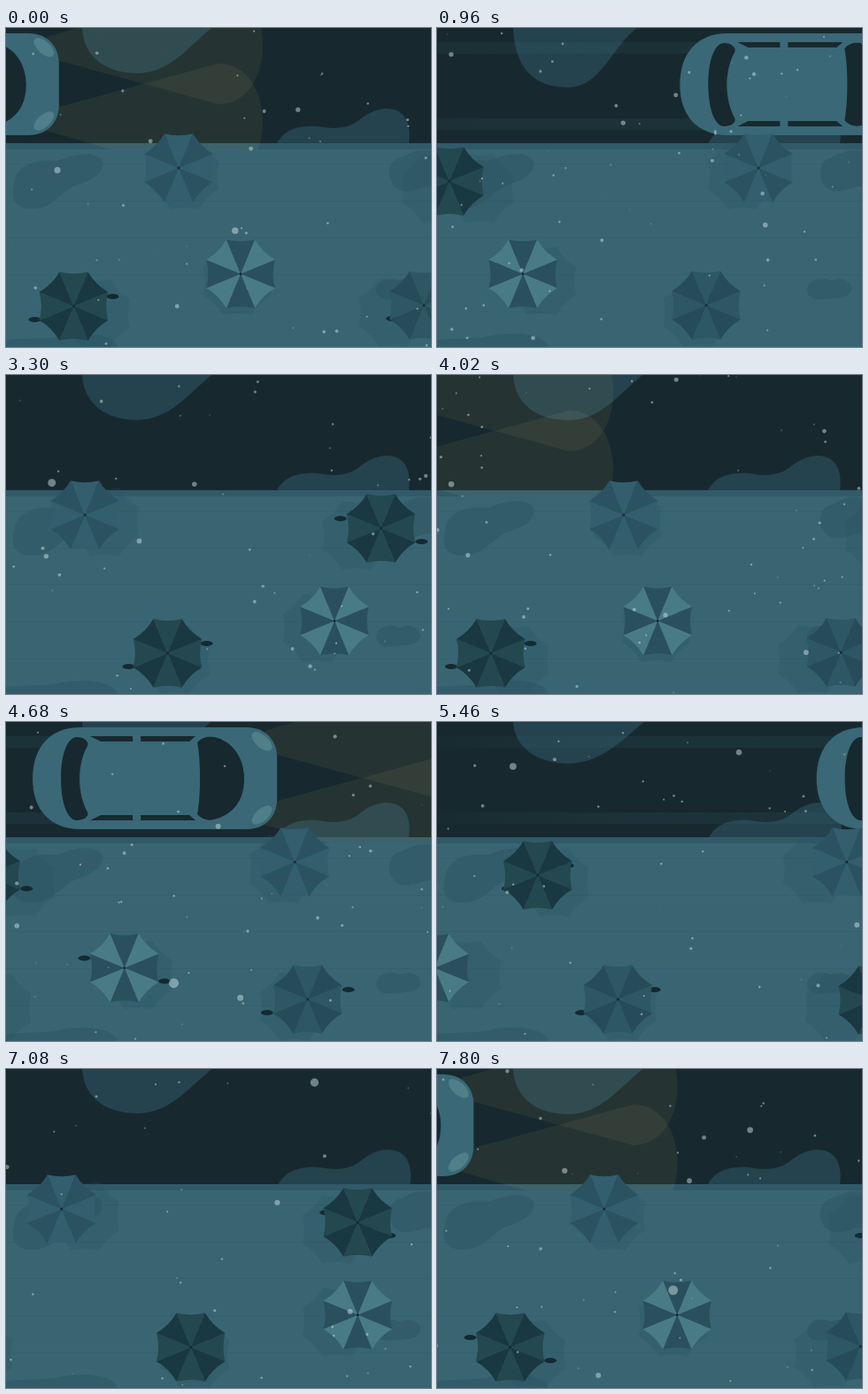
Write an HTML page that moves like this. It is 480 px wide and 360 px high and loops after 7860 ms.

```html
<!DOCTYPE html>
<html lang="en">
<head>
<meta charset="utf-8">
<title>Night street from above</title>
<style>
html, body { margin: 0; width: 100%; height: 100%; overflow: hidden; background: #17292f; }
svg { display: block; width: 100vw; height: 100vh; }
</style>
</head>
<body>
<svg viewBox="0 0 480 360" xmlns="http://www.w3.org/2000/svg">
  <defs>
    <linearGradient id="fade">
      <stop offset="0" stop-color="#3a6876" stop-opacity="0"/>
      <stop offset=".5" stop-color="#3a6876" stop-opacity=".14"/>
      <stop offset="1" stop-color="#3a6876" stop-opacity=".14"/>
    </linearGradient>
    <clipPath id="street"><rect width="480" height="137"/></clipPath>
    <path id="beam" d="M-14 10 L180 -46 C247 -46 247 86 180 86 L-14 33Z"/>
    <path id="sideGlass" d="M65 16H113V22H77ZM122 16H184L177 22H122Z"/>
  </defs>

  <rect width="480" height="360" fill="#17292f"/>
  <g fill="#24434f">
    <path id="topPuddle"/>
    <path id="sidePuddle" d="M306 130C316 112 335 110 352 111C375 115 387 113 400 103C415 91 431 88 443 94C455 101 457 116 455 130Z"/>
  </g>
  <rect y="130" width="480" height="7" fill="#315a69"/>
  <rect y="137" width="480" height="223" fill="#396573"/>
  <path d="M0 153.500H480M0 195.500H480M0 236.500H480M0 278.500H480M0 320.500H480" stroke="#325a67" stroke-width="1" opacity=".5"/>
  <g fill="#335c6a">
    <path d="M9 176C12 153 34 148 58 150C78 141 104 138 109 151C112 168 88 174 76 179C60 188 50 205 28 204C9 204 5 190 9 176Z"/>
    <path d="M480 139C463 134 453 144 440 148C428 158 431 180 448 184C462 186 470 178 480 179Z"/>
    <path d="M418 296C418 285 432 279 444 285C458 280 470 286 468 296C464 307 447 305 438 306C426 308 418 304 418 296Z"/>
    <path d="M0 352C25 349 42 352 62 347C88 342 122 345 126 360H0Z"/>
  </g>

  <g clip-path="url(#street)">
    <g id="car">
      <g fill="url(#fade)">
        <rect x="-470" y="16" width="500" height="13"/>
        <rect x="-470" y="102" width="500" height="13"/>
      </g>
      <g transform="translate(276 0)" fill="#f5d27a" fill-opacity=".06">
        <use href="#beam"/>
        <use href="#beam" transform="translate(0 126) scale(1 -1)"/>
      </g>
      <path d="M54 6H242C262 6 276 20 276 40V87C276 107 262 121 242 121H54C20 121 0 99 0 64C0 28 20 6 54 6Z" fill="#3a6876"/>
      <g fill="#17292f">
        <path d="M32 64C32 34 40 17 50 17C58 17 64 22 62 27C50 48 50 80 62 102C64 107 57 111 50 111C40 111 32 93 32 64Z"/>
        <path d="M186 23C191 17 198 16 205 17C228 22 239 43 239 64C239 87 228 104 205 110C197 112 190 109 186 104C190 82 190 45 186 23Z"/>
        <use href="#sideGlass"/>
        <use href="#sideGlass" transform="translate(0 127) scale(1 -1)"/>
      </g>
      <g fill="#4f808a">
        <ellipse rx="14" ry="7" transform="translate(259 22) rotate(42)"/>
        <ellipse rx="14" ry="7" transform="translate(259 105) rotate(-42)"/>
      </g>
    </g>
  </g>
  <g id="shadows" fill="#2b5160" opacity=".25"></g>
  <g id="walkers"></g>
  <g id="snow" fill="#c9dde0"></g>
</svg>

<script>
const LOOP = 7860, STEP = 60, WALK_CYCLE = 3930;
const WALK_SPEED = 0.175, WALK_SPAN = 683.5;
const CAR_SPEED = 0.511, CAR_LENGTH = 276;
const CAR_ENTRIES = [-117, 4081, 7719];
const FLAKE_LIFE = LOOP / 10;

const byId = id => document.getElementById(id);
const mod = (a, n) => ((a % n) + n) % n;

function add(parent, tag, attrs = {}) {
  const el = document.createElementNS('http://www.w3.org/2000/svg', tag);
  for (const key in attrs) el.setAttribute(key, attrs[key]);
  parent.appendChild(el);
  return el;
}

const polar = (r, deg) => {
  const a = deg * Math.PI / 180;
  return `${(r * Math.cos(a)).toFixed(2)} ${(r * Math.sin(a)).toFixed(2)}`;
};
const scallop = i => `Q${polar(34.5, i * 45)} ${polar(42, i * 45 + 22.5)}`;
const wedge = i => `M0 0L${polar(42, i * 45 - 22.5)}${scallop(i)}Z`;
const canopy = `M${polar(42, -22.5)}${[0, 1, 2, 3, 4, 5, 6, 7].map(scallop).join('')}Z`;

// dir: walking direction; stride and peak time the foot on the +y side
const walkers = [
  { x: 195, y: 158, dir: 1, even: '#325e6e', odd: '#2b5261' },
  { x: -154, y: 173, dir: 1, even: '#24484f', odd: '#1a3841', stride: 1270, peak: 745 },
  { x: 265, y: 277.5, dir: -1, even: '#2a505d', odd: '#497b85', stride: 1080, peak: 2400 },
  { x: 760, y: 314, dir: -1, even: '#24484f', odd: '#1a3841', stride: 1100, peak: 2250 },
  { x: 472, y: 313, dir: -1, even: '#2e5765', odd: '#264c59', stride: 840, peak: 750 }
];

for (const w of walkers) {
  w.shadow = add(byId('shadows'), 'path', { d: canopy });
  w.group = add(byId('walkers'), 'g');
  w.feet = w.stride
    ? [1, -1].map(() => add(w.group, 'ellipse', { rx: 7, ry: 3, fill: '#142a32' }))
    : [];
  for (let i = 0; i < 8; i++) {
    add(w.group, 'path', { d: wedge(i), fill: i % 2 ? w.odd : w.even });
  }
  add(w.group, 'circle', { r: 1.5, fill: '#142a32' });
}

const noise = n => mod(Math.sin(n * 127.1 + 11.7) * 43758.5453, 1);
const flakes = Array.from({ length: 160 }, () => add(byId('snow'), 'circle'));

function drawWalkers(t) {
  const q = t % WALK_CYCLE;
  for (const w of walkers) {
    const x = mod(w.x + w.dir * WALK_SPEED * q + 110, WALK_SPAN) - 110;
    w.group.setAttribute('transform', `translate(${x} ${w.y})`);
    w.shadow.setAttribute('transform', `translate(${x + (240 - x) * 0.15} ${w.y + 8})`);
    w.feet.forEach((foot, i) => {
      const side = i ? -1 : 1;
      const swing = Math.cos((q - w.peak) / w.stride * 2 * Math.PI);
      foot.setAttribute('cx', 46 * w.dir * side * swing);
      foot.setAttribute('cy', i ? -11 : 15);
    });
  }
}

function drawStreet(t) {
  const entry = CAR_ENTRIES.filter(e => t > e - 600).pop();
  const front = (t - entry) * CAR_SPEED;
  byId('car').setAttribute('transform', `translate(${front - CAR_LENGTH} 0)`);

  // Puddles keep wobbling after the car has driven over them.
  const since = x => t - entry - (x + CAR_LENGTH / 2) / CAR_SPEED;
  const a = since(150);
  const depth = a <= 0 ? 0 : 16 * Math.min(1, a / 300)
    * Math.exp(-Math.max(0, a - 514) / 790) * Math.cos((a - 514) / 440 * 2 * Math.PI);
  const bottom = 51 + depth;
  byId('topPuddle').setAttribute('d',
    `M86 0C88 ${35 + depth} 115 ${bottom} 148 ${bottom}C185 ${bottom} ${205 - depth / 2} 22 ${232 - depth / 2.5} 0Z`);

  const b = since(380);
  const shift = b > 0 && b < 2400 ? 3 * Math.sin(Math.PI * b / 2400) : 0;
  byId('sidePuddle').setAttribute('transform', `translate(${shift} 0)`);
}

// Flakes fall away from the viewer, so they shrink towards the centre.
function drawSnow(t) {
  flakes.forEach((flake, i) => {
    const age = t / FLAKE_LIFE + noise(i + 1);
    const seed = i * 10 + Math.floor(age) % 10;
    const depth = 0.06 + 1.04 * (age % 1);
    flake.setAttribute('cx', 240 + (noise(seed + 300) - 0.5) * 540 / depth);
    flake.setAttribute('cy', 180 + (noise(seed + 4100) - 0.5) * 420 / depth);
    flake.setAttribute('r', Math.min(13, 1 / depth));
    flake.setAttribute('opacity', Math.min(0.5, 3.5 * (1.1 - depth)));
  });
}

function draw(t) {
  drawStreet(t);
  drawWalkers(t);
  drawSnow(t);
}

const start = performance.now();
function tick() {
  const t = (performance.now() - start) % LOOP;
  draw(Math.floor(t / STEP) * STEP);
  requestAnimationFrame(tick);
}
tick();
</script>
</body>
</html>
```
